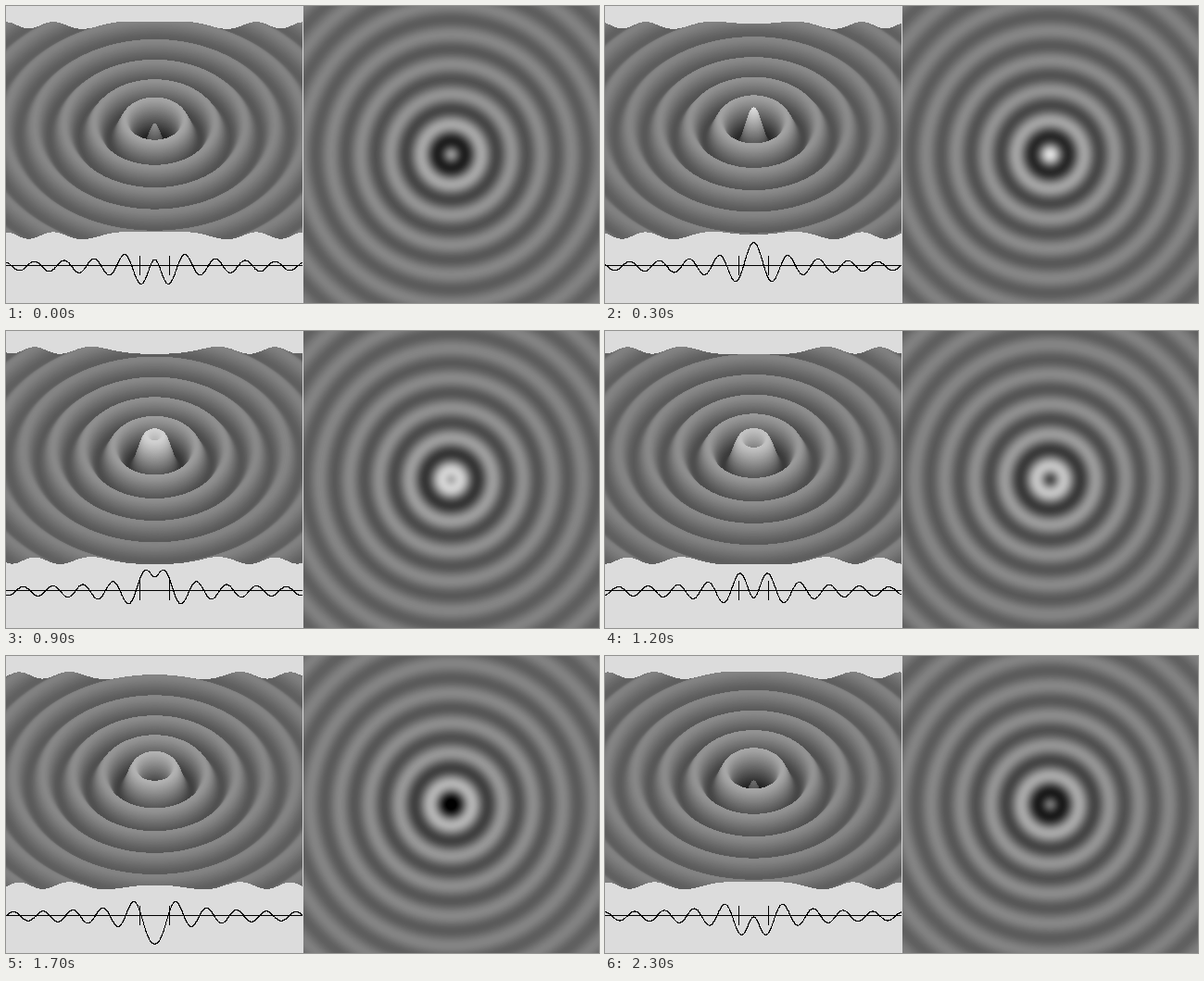
A matplotlib script for the animation above (2400 ms loop, 640x321 px).

```python
import numpy as np
import matplotlib
import matplotlib.pyplot as plt
from matplotlib.animation import FuncAnimation

W, H = 640, 321
FRAMES, LOOP_MS = 24, 2400
WAVELENGTH, CORE, SHIFT = 32, 9.1, 2.3
PEAK, DECAY = 30, 0.66
TILT, LIFT = np.sqrt(0.5), 0.94
BACKGROUND = 220
AXIS_Y = 280


def height(r, turn):
    """Outgoing ripple, rounded off near its centre."""
    dist = np.hypot(r, CORE)
    phase = 2 * np.pi * ((dist - SHIFT) / WAVELENGTH - turn)
    return PEAK * (CORE / dist) ** DECAY * np.cos(phase)


def shade(z):
    return np.clip(112 + 4.2 * z, 0, 255)


def pixel(v):
    return np.rint(v).astype(int)


cols = np.arange(320)
depth = np.arange(-160, 160.01, 0.125)[:, None]
surface_r = np.hypot(cols - 160, depth)
map_r = np.hypot(np.arange(321, W) - 480, (np.arange(H) - 160)[:, None])
curve_x = np.arange(0, 319.01, 0.125)


def draw_surface(img, turn):
    z = height(surface_r, turn)
    rows = pixel(134 + TILT * depth - LIFT * z)
    # back to front, nearer rows cover farther ones
    for row, gray in zip(rows, shade(z)):
        img[row, cols] = gray


def draw_profile(img, turn):
    img[AXIS_Y, :320] = 0
    img[AXIS_Y - 10:AXIS_Y + 11, [144, 176]] = 0
    y = AXIS_Y + 0.7 - height(np.abs(curve_x - 160), turn)
    img[pixel(y), pixel(curve_x)] = 0


def render(turn):
    img = np.full((H, W), BACKGROUND, float)
    img[:, 321:] = shade(height(map_r, turn))
    draw_surface(img, turn)
    draw_profile(img, turn)
    return img


fig = plt.figure(figsize=(W / 100, H / 100), dpi=100)
ax = fig.add_axes([0, 0, 1, 1])
ax.axis("off")
picture = ax.imshow(np.zeros((H, W)), cmap="gray", vmin=0, vmax=255,
                    aspect="auto", interpolation="nearest")


def update(i):
    picture.set_data(render(i / FRAMES))
    return picture,


anim = FuncAnimation(fig, update, frames=FRAMES, interval=LOOP_MS / FRAMES,
                     repeat=True, repeat_delay=0)
plt.show()
```
